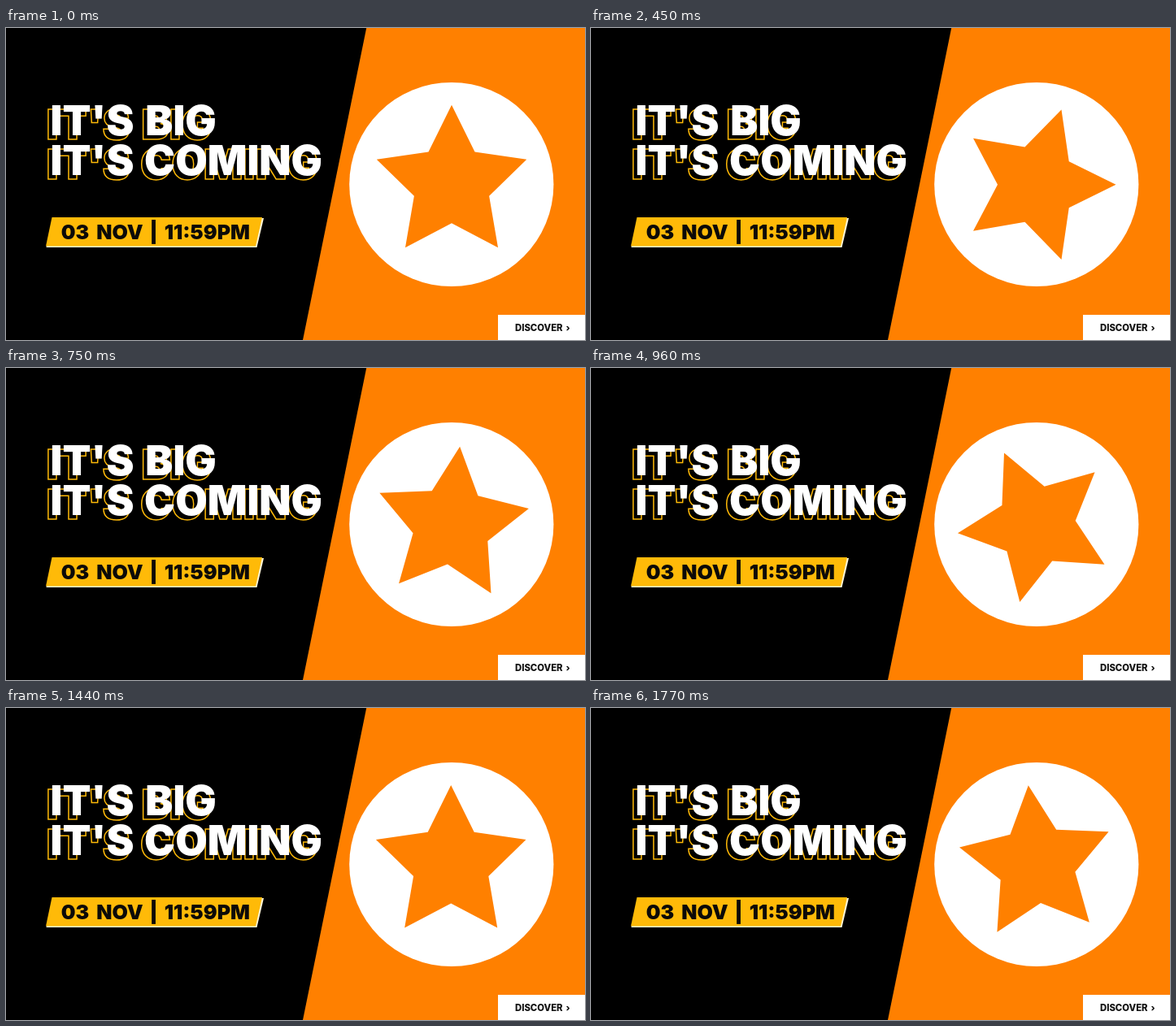
An HTML page with a canvas that plays this animation: 712x384 px, repeating every 1.8 s.

```html
<!DOCTYPE html>
<html lang="en">
<head>
<meta charset="utf-8">
<title>It's big, it's coming</title>
<style>
html, body { margin: 0; width: 100%; height: 100%; overflow: hidden; background: #000; }
canvas { display: block; }
</style>
</head>
<body>
<canvas id="stage" width="712" height="384"></canvas>
<script>
const ctx = document.getElementById('stage').getContext('2d');
const ORANGE = '#ff8000', GOLD = '#ffba08', WHITE = '#fff', BLACK = '#000';
const LOOP = 1800, STEP = 30;
const TITLE = [["IT'S", 106, 131.5], ['BIG', 215, 131.5], ["IT'S", 106, 180.5], ['COMING', 279.5, 180.5]];
const DATE = [['03', 85], ['NOV', 140], ['|', 181.5], ['11:59PM', 247.3]];

function poly(points, fill) {
  ctx.beginPath();
  points.forEach(([x, y]) => ctx.lineTo(x, y));
  ctx.closePath();
  ctx.fillStyle = fill;
  ctx.fill();
}

function font(weight, size) {
  ctx.font = `${weight} ${size}px Inter, "Open Sans", sans-serif`;
}

function drawTitle() {
  font(900, 51);
  ctx.strokeStyle = GOLD;
  ctx.lineWidth = 1.5;
  ctx.lineJoin = 'miter';
  ctx.miterLimit = 3;
  TITLE.forEach(([word, x, y]) => ctx.strokeText(word, x - 5, y + 5.5));
  ctx.fillStyle = WHITE;
  TITLE.forEach(([word, x, y]) => ctx.fillText(word, x, y));
}

function drawDate() {
  poly([[58, 234], [317, 234], [308.5, 270], [49.5, 270]], '#fff6d8');
  poly([[56.5, 233], [315, 233], [307, 268.5], [49, 268.5]], GOLD);
  font(900, 25);
  ctx.fillStyle = '#0c0a08';
  DATE.forEach(([word, x]) => ctx.fillText(word, x, 260));
}

function drawButton() {
  ctx.fillStyle = WHITE;
  ctx.fillRect(605, 353, 107, 31);
  font(800, 11.3);
  ctx.fillStyle = '#111';
  ctx.fillText('DISCOVER', 655.3, 373.3);
  ctx.fillText('›', 691, 373.3);
}

function drawStar(angle) {
  ctx.save();
  ctx.translate(547.8, 192.5);
  ctx.fillStyle = WHITE;
  ctx.beginPath();
  ctx.arc(0, 0, 125.6, 0, Math.PI * 2);
  ctx.fill();

  ctx.rotate(angle);
  // The star sits slightly off its pivot.
  ctx.translate(0.2, -0.7);
  const points = Array.from({ length: 10 }, (_, i) => {
    const r = i % 2 ? 48.5 : 97, a = i * Math.PI / 5;
    return [r * Math.sin(a), -r * Math.cos(a)];
  });
  poly(points, ORANGE);
  ctx.restore();
}

function draw(now) {
  const t = Math.floor((now % LOOP) / STEP) * STEP;
  ctx.fillStyle = BLACK;
  ctx.fillRect(0, 0, 712, 384);
  poly([[443.2, 0], [712, 0], [712, 384], [365, 384]], ORANGE);
  ctx.textAlign = 'center';
  ctx.textBaseline = 'alphabetic';
  drawTitle();
  drawDate();
  drawStar(t / LOOP * Math.PI * 2);
  drawButton();
}

const start = performance.now();
function tick() {
  draw(performance.now() - start);
  requestAnimationFrame(tick);
}
tick();
</script>
</body>
</html>
```
